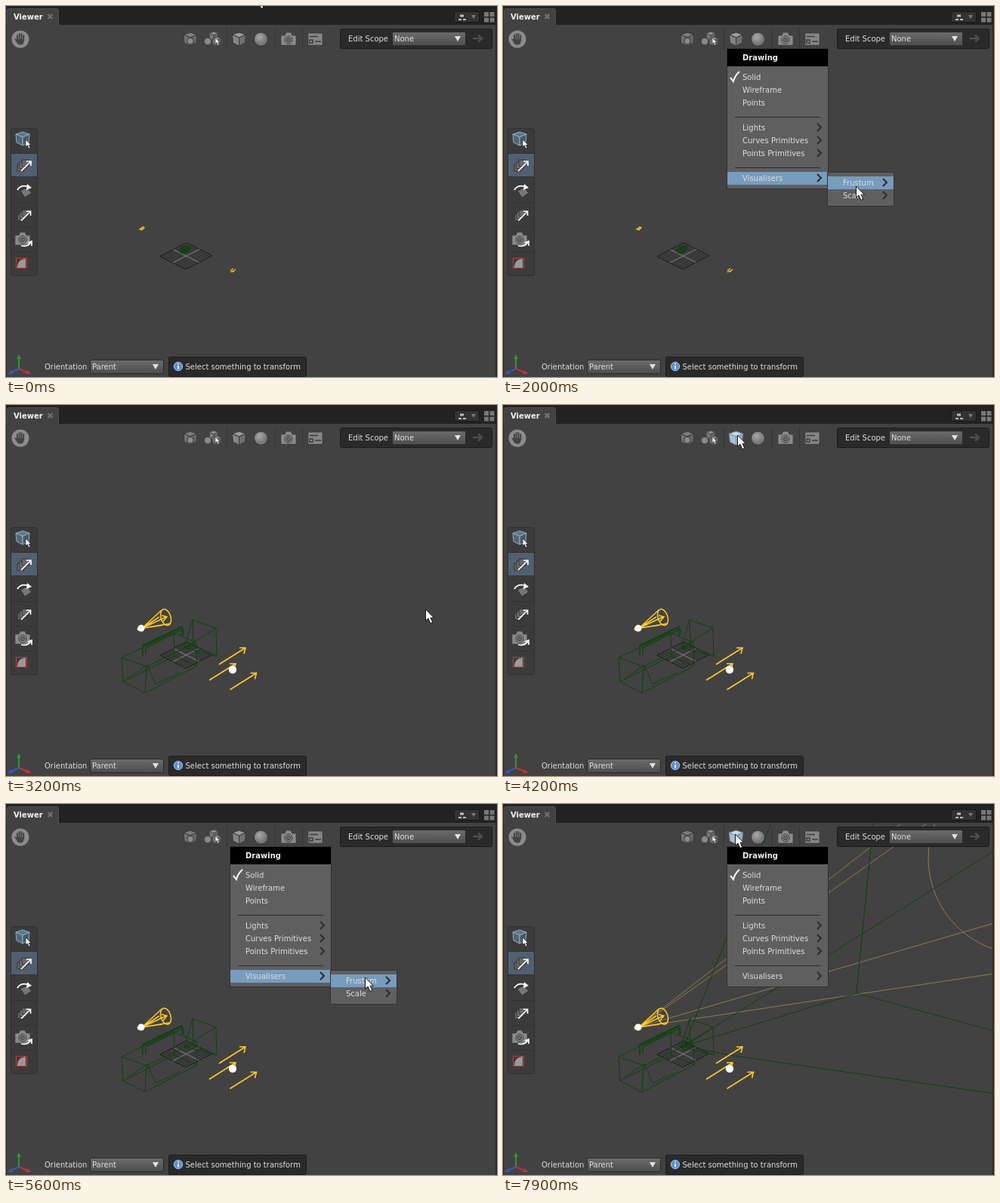
Recreate the animation shown at these times as an HTML page. Size 650 by 492 pixels, loop 8000 ms.

```html
<!DOCTYPE html>
<html lang="en">
<head>
<meta charset="utf-8">
<title>Viewer</title>
<style>
html, body { margin: 0; width: 100%; height: 100%; overflow: hidden; background: #424242; }
svg { display: block; width: 650px; height: 492px; }
text { font: 10px "DejaVu Sans", sans-serif; fill: #dedede; white-space: pre; }
.bold { font-weight: bold; fill: #f2f2f2; }
.line { fill: none; }
</style>
</head>
<body>
<svg id="stage" viewBox="0 0 650 492" xmlns="http://www.w3.org/2000/svg"></svg>
<script>
const LOOP = 8000, STEP = 100;
const stage = document.getElementById('stage');

const path = (d, stroke, width = 1, fill = 'none', extra = '') =>
  `<path d="${d}" fill="${fill}" stroke="${stroke}" stroke-width="${width}" ${extra}/>`;
const rect = (x, y, w, h, fill, stroke = 'none', r = 0) =>
  `<rect x="${x}" y="${y}" width="${w}" height="${h}" rx="${r}" fill="${fill}" stroke="${stroke}"/>`;
const dot = (x, y, r, fill, stroke = 'none') =>
  `<circle cx="${x}" cy="${y}" r="${r}" fill="${fill}" stroke="${stroke}"/>`;
const text = (x, y, s, cls = '') => `<text x="${x}" y="${y}" class="${cls}">${s}</text>`;
const group = (x, y, body, scale = 1) => `<g transform="translate(${x} ${y}) scale(${scale})">${body}</g>`;

// Three-faced box around 0,0
const cube = (top, left, right, edge) =>
  path('M0-9L9-6L0-2L-9-6Z', edge, 1, top) +
  path('M-9-6L0-2V9L-8 5Z', edge, 1, left) +
  path('M9-6L0-2V9L8 5Z', edge, 1, right);

const pointer = path('M0 0V15L3.6 12L6.3 18.5L9.3 17.2L6.6 11.2H11Z', '#111', 1, '#fff');
const select = (x, y, w, label) =>
  rect(x + .5, y + .5, w, 18, 'url(#button)', '#2b2b2b', 2) +
  text(x + 3, y + 13, label) + path(`M${x + w - 14} ${y + 6}h8l-4 7z`, 'none', 0, '#e2e2e2');
const arrowTool = path('M-9-2h9v9h-9z', '#333', 1, '#666') + path('M-6-5h9v9h-9z', '#333', 1, '#777') +
  path('M-3-8h9v9h-9z', '#333', 1, '#686868') + path('M-4 7L8-5M3-6H9V0', '#fff', 1.7);
const camera = path('M-10-5h5l2-4h6l2 4h5v13h-20z', '#333', .6, '#8a8a8a') +
  dot(0, 1, 5, '#8a8a8a', '#3a3a3a') + dot(0, 1, 2.6, '#6c6c6c', '#3a3a3a');

function defs() {
  return `<defs>
    <linearGradient id="button" x2="0" y2="1"><stop stop-color="#6c6c6c"/><stop offset="1" stop-color="#4d4d4d"/></linearGradient>
    <radialGradient id="ball" cx=".4" cy=".35"><stop stop-color="#a8a8a8"/><stop offset="1" stop-color="#787878"/></radialGradient>
    <clipPath id="view"><path d="M1 26H648V492H1z"/></clipPath></defs>`;
}

function frame() {
  return rect(0, 0, 650, 25, '#222') + rect(0, 0, 1, 492, '#282828') + rect(648, 25, 2, 467, '#282828') +
    path('M1.5 26V6Q1.5 3.5 4 3.5H67Q69.5 3.5 69.5 6V26', '#4c4c4c', 1, '#424242') +
    text(10, 18, 'Viewer', 'bold') + path('M55.5 11l6 6m0-6l-6 6', '#727272', 2.2) +
    rect(593.5, 7.5, 33, 14, '#333', '#191919', 2) +
    path('M601 11.5h5v3h-5zM599 17h4v2h-4zM605 17h4v2h-4z', 'none', 0, '#bbb') +
    path('M616 12h6l-3 5z', 'none', 0, '#777') +
    path('M633 8h6v6h-6zM640.500 8h6v6h-6zM633 15.500h6v6h-6zM640.500 15.500h6v6h-6z', 'none', 0, '#777');
}

function toolbar() {
  const hand = path('M-4-5V1M-1.300-7V1M1.500-7V1M4.200-5V2', '#444', 2, 'none', 'stroke-linecap="round"') +
    path('M-5 0L-8-1L-4 6Q0 9 4 6L5 0Z', 'none', 0, '#444');
  const small = group(0, 0, cube('#929292', '#777', '#666', '#444'), .65);
  return group(19, 44, dot(0, 0, 11.5, '#8b8b8b') + hand) +
    path('M292.500 30V57M356.500 30V57M392.500 30V57', '#353535') +
    group(244, 44, cube('#7b7b7b', '#747474', '#686868', '#383838') +
      path('M-4 0L0-2L4 0V5L0 7L-4 5Z', '#383838', 1, '#8c8c8c')) +
    group(275, 40, small) + group(279, 47, small) + dot(267, 47, 4.7, '#888', '#444') +
    group(277, 42, pointer, .55) +
    dot(337.5, 44, 9, 'url(#ball)', '#3a3a3a') +
    group(374, 44, camera) +
    path('M400 36h19v16h-19z', '#333', .6, '#858585') +
    path('M402 40.500h11M402 45h4v4h-4zM409 47h8', '#3c3c3c', 1.5) +
    rect(442.5, 30.5, 201, 26, '#2a2a2a', '#1d1d1d', 2) + text(453, 47, 'Edit Scope') +
    select(511, 34, 97, 'None') + path('M618 43H629M625 38.500L630 43L625 47.500', '#4d4d4d', 2.4);
}

function tools() {
  const bend = path('M-9-1Q-4-9 6-5', '#fff', 1.8) + path('M4-9L10-4L3-1Z', 'none', 0, '#fff');
  let s = rect(6.5, 162.5, 35, 195, '#3b3b3b', '#303030', 2) + rect(7, 196, 34, 30, '#506070');
  s += path('M7 195.500H41M7 226.500H41M7 260.500H41M7 293.500H41M7 326.500H41', '#323232');
  s += group(22, 176, cube('#607887', '#526775', '#485b68', '#8bafc3')) + group(26, 177, pointer, .65);
  s += group(24, 212, arrowTool) + group(24, 278, arrowTool, .95);
  s += group(24, 245, path('M-5 0L4-4L10 3L1 9Z', '#333', 1, '#777') + bend);
  s += group(22, 309, camera) + path('M20 318Q29 320 33 313M29 314L34 312L34 318', '#fff', 1.7);
  s += path('M13.500 334.500h14v13h-14z', '#c23838', 1.2) + path('M15 347V345Q16 336 26 335V347Z', 'none', 0, '#999');
  return s;
}

function footer() {
  return path('M17 481V465', '#2b9a2b', 2) + path('M14 468L17 462L20 468Z', 'none', 0, '#2b9a2b') +
    path('M17 481L30 487', '#c43232', 2) + path('M28 483L34 488L26 488Z', 'none', 0, '#c43232') +
    path('M17 481L5 487', '#3057c9', 2) + path('M7 483L2 488L9 488Z', 'none', 0, '#3057c9') +
    text(51, 482, 'Orientation') + select(111, 469, 97, 'Parent') +
    rect(215.5, 465.5, 182, 26, '#2a2a2a', '#1d1d1d', 2) +
    dot(228, 478, 5.7, '#5c8fd6', '#a9c5ec') + path('M228 474v1.600M228 477v4.500', '#fff', 1.7) +
    text(237.5, 482, 'Select something to transform');
}

function grid() {
  const at = (u, v) => `${204 + 35 * u + 34 * v} ${332 - 18 * u + 17 * v}`;
  let dark = '', light = '';
  for (let i = 0; i <= 10; i++) {
    const k = i / 10, d = `M${at(k, 0)}L${at(k, 1)}M${at(0, k)}L${at(1, k)}`;
    if (i === 5) light = d; else dark += d;
  }
  return path(dark, '#2b2b2b', .6) + path(`M${at(0, 0)}L${at(1, 0)}L${at(1, 1)}L${at(0, 1)}Z`, '#1c1c1c', 1) +
    path(light, '#858585', .9);
}

const tiny =
  path('M229 325L234 319L242 318L245 321L240 326L232 328Z', '#103f10', 1, '#194019') +
  path('M177 296l4-3 2 1-3 3zM178 297l5-3', '#f4c21f', 1.4) +
  path('M297 351l4-3M297 353l4-2M300 353l4-4', '#f4c21f', 1.3);

function large() {
  const green = path('M153 335L222 302L252 315L186 347ZM155 367L184 382L253 346L223 333ZM153 335L155 367M186 347L184 382M252 315L253 346M222 302L223 333' +
    'M160 363L187 345L198 370L231 355' +
    'M247 285L278 296L279 333L248 320ZM236 322L247 285M236 322L278 296M236 322L279 333M236 322L248 320', '#0d430d');
  const handle = path('M181 333V320L233 295V307M185 331V322L235 297V305M180 319L234 293', '#0d430d', 1.3);
  const arrow = (x, y) => `M${x} ${y}l35-22m-8 0l8 0l-2 8`;
  const rays = path('M180 296L206 272M180 296L203 281M180 296L212 281M180 296L217 290M180 296L207 292M206 279L213 281L208 287', '#ffcb1f', 1.5) +
    '<ellipse cx="211.5" cy="281.500" rx="6.500" ry="11" transform="rotate(-18 211.500 281.500)" fill="none" stroke="#ffcb1f" stroke-width="1.500"/>';
  return green + handle + rays + dot(176, 297, 2.5, '#ffcb1f') + dot(179, 296, 4.6, '#fff') +
    path(arrow(282, 344) + arrow(269, 365) + arrow(296.5, 377.5), '#ffcb1f', 1.6) + dot(300, 351, 5.2, '#fff');
}

const frusta =
  path('M179 296L528 25M179 296L562 25M179 296L650 158M179 296L650 225', '#9a8350', .9) +
  `<circle cx="690" cy="72" r="127" fill="none" stroke="#9a8350" stroke-width=".9"/>` +
  path('M240 321L355 25M240 321L650 62M240 321L300 333L650 384M240 321L468 251M490 25L468 251L650 301', '#0c420c', 1) +
  path('M234 320L247 316L250 322L240 327Z', '#0c420c', 1.2);

// Menu rows: [label, centre y, has submenu]
const menus = {
  main: { x: 297, w: 133, y: 57, h: 185, lines: [147, 214], check: 94, rows: [
    ['Solid', 94], ['Wireframe', 111], ['Points', 128], ['Lights', 161, 1],
    ['Curves Primitives', 178, 1], ['Points Primitives', 195, 1], ['Visualisers', 228, 1]] },
  vis: { x: 430, w: 87, y: 221, h: 44, lines: [], rows: [['Frustum', 234, 1], ['Scale', 251, 1]] },
  frustum: { x: 517, w: 121, y: 227, h: 61, lines: [], check: 257, rows: [['Off', 240], ['When Selected', 257], ['On', 274]] },
  scale: { x: 517, w: 83, y: 244, h: 94, lines: [310], check: 257, rows: [['1', 257], ['10', 274], ['100', 291], ['Other...', 324]] }
};

function menu(m, cursor, held) {
  const inside = cursor.x >= m.x && cursor.x < m.x + m.w;
  let s = rect(m.x - .5, m.y - .5, m.w + 1, m.h + 1, '#5f5f5f', '#323232');
  if (m === menus.main) s += rect(m.x, m.y, m.w, 23, '#000') + text(317, 72, 'Drawing', 'bold');
  for (const y of m.lines) s += path(`M${m.x + 10} ${y + .5}H${m.x + m.w - 10}`, '#2c2c2c');
  for (const [label, y, more] of m.rows) {
    const on = held ? label === held : inside && Math.abs(cursor.y - y) <= 8;
    if (on) s += rect(m.x, y - 8, m.w, 17, '#779cbd');
    s += text(m.x + 20, y + 4, label);
    if (more) s += path(`M${m.x + m.w - 14} ${y - 5}l5 5l-5 5`, '#303030', 2.2);
  }
  if (m.check) s += path(`M${m.x + 4} ${m.check + 1}L${m.x + 8} ${m.check + 6}Q${m.x + 10} ${m.check - 2} ${m.x + 16} ${m.check - 7}`, '#fff', 2);
  return s;
}

// Pointer track: time, x, y
const track = [
  [0, 331, -15], [500, 309, 38], [600, 307, 42], [700, 308, 46], [900, 322, 74], [1200, 355, 160], [1500, 378, 223], [1600, 378, 223],
  [2000, 467, 239], [2200, 478, 249], [2500, 505, 253], [2700, 525, 254], [2900, 553, 269], [3200, 555, 271], [3400, 546, 273],
  [3900, 340, 75], [4100, 309, 41], [4200, 310, 40], [4300, 309, 46], [4700, 355, 185], [4900, 390, 226], [5000, 390, 226],
  [5600, 475, 230], [5900, 492, 233], [6300, 528, 252], [6700, 550, 270], [6800, 551, 272],
  [7300, 335, 70], [7500, 305, 41], [7700, 307, 41], [7900, 307, 40]
];

function cursorAt(t) {
  const i = track.findIndex(k => k[0] >= t);
  const [t1, x1, y1] = track[i], [t0, x0, y0] = track[Math.max(0, i - 1)];
  const k = t1 === t0 ? 1 : (t - t0) / (t1 - t0);
  return { x: Math.round(x0 + (x1 - x0) * k), y: Math.round(y0 + (y1 - y0) * k) };
}

const within = (t, ...spans) => spans.some(([a, b]) => t >= a && t < b);

function layer() {
  const g = document.createElementNS('http://www.w3.org/2000/svg', 'g');
  stage.append(g);
  return g;
}

stage.innerHTML = defs() + rect(0, 0, 650, 492, '#424242');
const [scene, chrome, live] = [layer(), layer(), layer()];
scene.setAttribute('clip-path', 'url(#view)');
chrome.innerHTML = frame() + toolbar() + tools() + footer();
const big = large(), floor = grid();

function draw(t) {
  const c = cursorAt(t);
  const open = within(t, [700, 3000], [4300, 6800], [7800, 8000]);
  const sub = within(t, [1500, 3000], [5100, 6800]);
  const third = within(t, [2400, 3000]) ? 'Scale' : within(t, [5800, 6800]) ? 'Frustum' : '';
  const hover = c.x > 295 && c.x < 322 && c.y > 32 && c.y < 57 && (!open || t >= 7800);

  scene.innerHTML = (t >= 6800 ? frusta : '') + floor + (t < 3000 ? tiny : big);
  let s = group(308.5, 44, hover ? cube('#c8d8e6', '#a9bfd2', '#9bb0c2', '#7891a5') : cube('#9b9b9b', '#858585', '#707070', '#383838'));
  if (open) s += menu(menus.main, c, sub ? 'Visualisers' : '');
  if (sub) s += menu(menus.vis, c, third);
  if (third) s += menu(menus[third.toLowerCase()], c);
  live.innerHTML = s + group(c.x + .5, c.y, pointer);
}

let last = -1;
function tick() {
  const t = Math.floor(performance.now() % LOOP / STEP) * STEP;
  if (t !== last) draw(last = t);
  requestAnimationFrame(tick);
}
tick();
</script>
</body>
</html>
```
